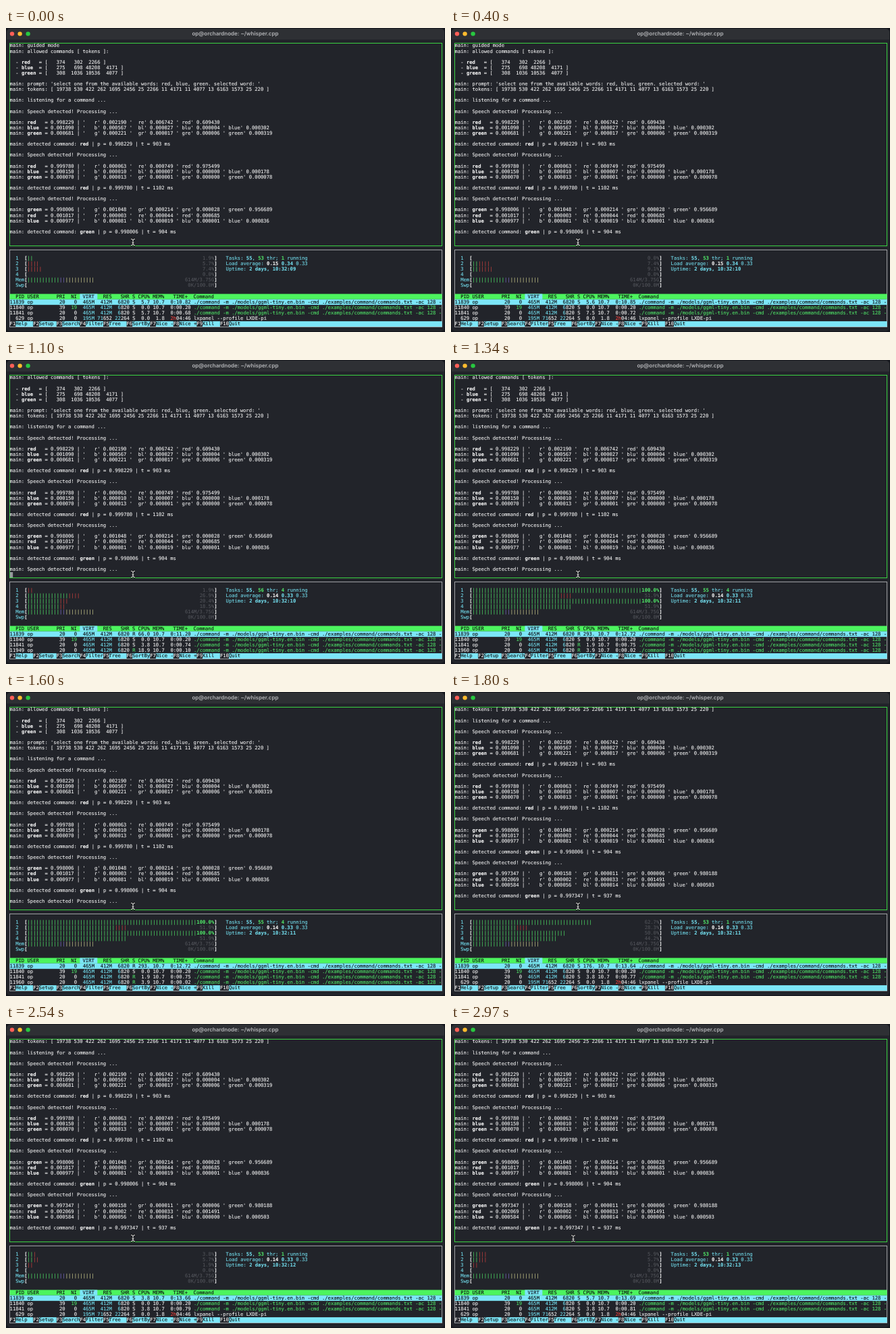
An HTML page that plays this animation: 650x450 px, repeating every 3000 ms.

```html
<!DOCTYPE html>
<html lang="en">
<head>
<meta charset="utf-8">
<title>Terminal</title>
<style>
  html, body { margin: 0; width: 100%; height: 100%; overflow: hidden; background: #14161c; }
  svg { display: block; }
  text { white-space: pre; text-rendering: geometricPrecision; }
  .mono { font: 7.182px "DejaVu Sans Mono", monospace; stroke-width: .1px; }
  .title { font: 600 8px Inter, sans-serif; }
</style>
</head>
<body>
<svg width="650" height="450" viewBox="0 0 650 450">
  <rect x="1" y="1" width="648" height="448" rx="5" fill="#22242a"/>
  <path d="M1 17V6a5 5 0 0 1 5-5H644a5 5 0 0 1 5 5V17Z" fill="#2e3034"/>
  <circle cx="9" cy="8.6" r="3.2" fill="#fe5f57"/>
  <circle cx="20.6" cy="8.6" r="3.2" fill="#febc2e"/>
  <circle cx="32.6" cy="8.6" r="3.2" fill="#28c840"/>
  <text class="title" x="339.5" y="11.4" text-anchor="middle" fill="#b4b5b8">op@orchardnode: ~/whisper.cpp</text>
  <rect x="5.5" y="22.5" width="640" height="300" fill="none" stroke="#3bd242"/>
  <rect x="5.5" y="328.5" width="640" height="114" fill="none" stroke="#9fa1a4"/>
  <g id="log" class="mono"></g>
  <g id="monitor" class="mono"></g>
  <rect id="cursor" x="5.9" y="314" width="4.3" height="8" fill="#95989c"/>
  <g id="pointer" fill="none" stroke-linecap="round">
    <path d="M-2.6-4.6Q0-4.6 0-3V3Q0 4.6-2.6 4.6M2.6-4.6Q0-4.6 0-3M2.6 4.6Q0 4.6 0 3M-1.2.9H1.2" stroke="#111" stroke-width="2.2"/>
    <path d="M-2.6-4.6Q0-4.6 0-3V3Q0 4.6-2.6 4.6M2.6-4.6Q0-4.6 0-3M2.6 4.6Q0 4.6 0 3M-1.2.9H1.2" stroke="#e8e8e8"/>
  </g>
</svg>
<script>
const LOOP = 3000;
const LEFT = 5.6, CELL = 4.324, ROW = 8.1, BASE = 6;
const LOG_TOP = 22.4, MONITOR_TOP = 328.8, COLS = 148;
const WHITE = '#f4f4f4', CYAN = '#72dcec', GREEN = '#4fe067', RED = '#c9423f',
      BLUE = '#7c6cc4', YELLOW = '#c9c98c', DIM = '#515359', BLACK = '#0c0e10',
      HEAD = '#4cf45e', SELECT = '#7ce6f8';
const $ = id => document.getElementById(id);

const put = (top, row, col, text, color = WHITE, bold = false) =>
  text.trim() ? `<text x="${LEFT + col * CELL}" y="${top + row * ROW + BASE}" fill="${color}" stroke="${color}"` +
    `${bold ? ' font-weight="700"' : ''}>${text}</text>` : '';

const fillCells = (row, col, width, color) =>
  `<rect x="${LEFT + col * CELL}" y="${MONITOR_TOP + row * ROW}" width="${width * CELL}" height="${ROW}" fill="${color}"/>`;

// Lays out [text, color, bold] runs one after another.
function runs(top, row, col, parts) {
  return parts.map(([text, color, bold]) => {
    const out = put(top, row, col, text, color, bold);
    col += text.length;
    return out;
  }).join('');
}

/* ---- command log; *word* marks bold ---- */
function score(word, p, ...values) {
  const last = values.length - 1;
  const probes = values.map((v, i) => {
    const token = i === last ? ' ' + word : word.slice(0, i + 1).padStart(4);
    return `'${token}' ${v.toFixed(6)}`;
  });
  return `main: *${word}*${' '.repeat(6 - word.length)}= ${p.toFixed(6)} | ${probes.join(' ')}`;
}

const tokens = (word, ...ids) =>
  `  - *${word}*${' '.repeat(6 - word.length)}= [ ${ids.map(n => String(n).padStart(5)).join(' ')} ]`;

const heard = (scores, word, p, ms) => [
  'main: Speech detected! Processing ...', '', ...scores, '',
  `main: detected command: *${word}* | p = ${p} | t = ${ms} ms`, ''
];

const lines = [
  'main: guided mode',
  'main: allowed commands [ tokens ]:', '',
  tokens('red', 374, 302, 2266),
  tokens('blue', 275, 698, 48208, 4171),
  tokens('green', 308, 1036, 10536, 4077), '',
  "main: prompt: 'select one from the available words: red, blue, green. selected word: '",
  'main: tokens: [ 19738 530 422 262 1695 2456 25 2266 11 4171 11 4077 13 6163 1573 25 220 ]', '',
  'main: listening for a command ...', '',
  ...heard([
    score('red', 0.998229, 0.002190, 0.006742, 0.609430),
    score('blue', 0.001090, 0.000567, 0.000027, 0.000004, 0.000302),
    score('green', 0.000681, 0.000221, 0.000017, 0.000006, 0.000319)
  ], 'red', '0.998229', 903),
  ...heard([
    score('red', 0.999780, 0.000063, 0.000749, 0.975499),
    score('blue', 0.000150, 0.000010, 0.000007, 0.000000, 0.000178),
    score('green', 0.000070, 0.000013, 0.000001, 0.000000, 0.000078)
  ], 'red', '0.999780', 1102),
  ...heard([
    score('green', 0.998006, 0.001048, 0.000214, 0.000028, 0.956689),
    score('red', 0.001017, 0.000003, 0.000044, 0.000685),
    score('blue', 0.000977, 0.000081, 0.000019, 0.000001, 0.000836)
  ], 'green', '0.998006', 904),
  ...heard([
    score('green', 0.997347, 0.000158, 0.000011, 0.000006, 0.980188),
    score('red', 0.002069, 0.000002, 0.000033, 0.001491),
    score('blue', 0.000584, 0.000056, 0.000014, 0.000000, 0.000503)
  ], 'green', '0.997347', 937)
];

const drawLog = scroll => lines.slice(scroll, scroll + 36).map((line, row) =>
  runs(LOG_TOP, row, 0, line.split('*').map((part, i) => [part, WHITE, i % 2 === 1]))).join('');

/* ---- process monitor ---- */
const COMMAND = './command -m ./models/ggml-tiny.en.bin -cmd ./examples/command/commands.txt -ac 128 -';
const PANEL = 'panel';

// cpus: [percent, green bars, red bars]; main, worker and extra: [state, cpu, time]
const samples = [
  { clock: '09', threads: 53, running: 1, load: ['0.15', '0.34'],
    cpus: [['1.9', 2, 0], ['5.7', 0, 4], ['7.4', 0, 5], ['0.0', 0, 0]],
    main: ['S', '5.7', '0:10.82'], worker: ['S', '5.7', '0:00.68'], extra: PANEL },
  { clock: '10', threads: 53, running: 1, load: ['0.15', '0.34'],
    cpus: [['0.0', 0, 0], ['7.4', 2, 4], ['9.1', 2, 5], ['0.0', 0, 0]],
    main: ['S', '5.6', '0:10.85'], worker: ['S', '7.5', '0:00.72'], extra: PANEL },
  { clock: '10', threads: 56, running: 4, load: ['0.14', '0.33'],
    cpus: [['1.9', 0, 2], ['26.9', 14, 4], ['20.4', 11, 3], ['18.5', 11, 2]],
    main: ['R', '66.0', '0:11.20'], worker: ['S', '3.8', '0:00.74'], extra: ['R', '18.9', '0:00.10'], pid: '11949' },
  { clock: '11', threads: 55, running: 4, load: ['0.14', '0.33'],
    cpus: [['100.0', 58, 0], ['51.9', 30, 4], ['100.0', 58, 0], ['51.9', 34, 0]],
    main: ['R', '293.', '0:12.72'], worker: ['R', '1.9', '0:00.75'], extra: ['R', '3.9', '0:00.02'], pid: '11960' },
  { clock: '11', threads: 53, running: 1, load: ['0.14', '0.33'],
    cpus: [['62.7', 41, 0], ['28.3', 15, 4], ['50.0', 32, 0], ['44.2', 29, 0]],
    main: ['S', '176.', '0:13.64'], worker: ['S', '3.8', '0:00.77'], extra: PANEL },
  { clock: '12', threads: 53, running: 1, load: ['0.14', '0.33'],
    cpus: [['3.8', 2, 1], ['5.7', 2, 2], ['1.9', 0, 2], ['0.0', 0, 0]],
    main: ['S', '3.8', '0:13.66'], worker: ['S', '3.8', '0:00.79'], extra: PANEL },
  { clock: '13', threads: 53, running: 1, load: ['0.14', '0.33'],
    cpus: [['5.9', 2, 3], ['5.7', 2, 3], ['1.9', 0, 2], ['0.0', 0, 0]],
    main: ['S', '5.7', '0:13.69'], worker: ['S', '3.8', '0:00.81'], extra: PANEL }
];

const screen = (row, col, ...parts) => runs(MONITOR_TOP, row, col, parts);

function meter(row, label, bars, value) {
  const full = value === '100.0%';
  return screen(row, 2, [label.padEnd(3), CYAN], ['[', WHITE, true],
      ...bars.map(([n, color]) => ['|'.repeat(n), color])) +
    screen(row, 70 - value.length, [value, full ? GREEN : DIM, full], [']', WHITE, true]);
}

// Thousands and megabytes are tinted, the rest stays white.
function size(row, col, text) {
  const [, big, rest] = /^(\d+M|\d+(?=\d{3}$))(.*)$/.exec(text);
  return screen(row, col + 5 - text.length, [big, CYAN], [rest, WHITE]);
}

function process(row, pid, [state, cpu, time], { pri = '20', ni = '0', sizes = ['465M', '412M', '6820'],
    mem = '10.7', command = COMMAND, color = GREEN, selected = false } = {}) {
  const ink = normal => selected ? BLACK : normal;
  const hours = /^\d+h/.exec(time)?.[0] ?? '';
  return (selected ? fillCells(row, 0, COLS, SELECT) : '') +
    screen(row, 0, [pid.padStart(5) + ' op'.padEnd(11) + pri.padStart(3), ink(WHITE)],
      [ni.padStart(4), ink(ni === '19' ? GREEN : WHITE)]) +
    sizes.map((s, i) => selected
      ? screen(row, 24 + i * 6, [s.padStart(5), BLACK])
      : size(row, 24 + i * 6, s)).join('') +
    screen(row, 42, [state, ink(state === 'R' ? GREEN : WHITE)],
      [cpu.padStart(5) + mem.padStart(5) + '  ', ink(WHITE)],
      [hours, '#f0403c'], [time.slice(hours.length) + ' ', ink(WHITE)],
      [command, ink(color)]);
}

function footer() {
  const labels = ['Help', 'Setup', 'Search', 'Filter', 'Tree', 'SortBy', 'Nice -', 'Nice +', 'Kill', 'Quit'];
  return labels.map((label, i) => {
    const key = `F${i + 1}`, col = i * 8, start = col + key.length;
    return fillCells(13, start, i === 9 ? COLS - start : 6, SELECT) +
      screen(13, col, [key, WHITE], [label, BLACK]);
  }).join('');
}

function drawMonitor(s) {
  const extra = s.extra === PANEL
    ? process(12, '629', ['S', '0.0', '2h04:46'], { sizes: ['195M', '71652', '22264'], mem: '1.8',
        command: 'lxpanel --profile LXDE-pi', color: WHITE })
    : process(12, s.pid, s.extra);
  return s.cpus.map(([pct, user, kernel], i) =>
      meter(i + 1, String(i + 1), [[user, GREEN], [kernel, RED]], pct + '%')).join('') +
    meter(5, 'Mem', [[11, GREEN], [2, BLUE], [10, YELLOW]], '614M/3.75G') +
    meter(6, 'Swp', [], '0K/100.0M') +
    screen(1, 74, ['Tasks: ', CYAN], ['55', CYAN, true], [', ', CYAN], [String(s.threads), GREEN, true],
      [' thr; ', CYAN], [String(s.running), GREEN, true], [' running', CYAN]) +
    screen(2, 74, ['Load average: ', CYAN], [s.load[0] + ' ', WHITE, true],
      [s.load[1] + ' ', CYAN, true], ['0.33', CYAN]) +
    screen(3, 74, ['Uptime: ', CYAN], [`2 days, 10:32:${s.clock}`, CYAN, true]) +
    fillCells(8, 0, COLS, HEAD) + fillCells(8, 24, 6, SELECT) +
    screen(8, 0, ['  PID USER      PRI  NI  VIRT   RES   SHR S CPU% MEM%   TIME+  Command', BLACK]) +
    process(9, '11839', s.main, { selected: true }) +
    process(10, '11840', ['S', '0.0', '0:00.20'], { pri: '39', ni: '19' }) +
    process(11, '11841', s.worker) + extra + footer();
}

/* ---- timeline ---- */
const SPEECH = 680, RESULT = 1650, REFRESH = 527, FIRST_REFRESH = 210;
const shown = {};

function update(id, key, draw) {
  if (shown[id] === key) return;
  shown[id] = key;
  $(id).innerHTML = draw();
}

function render(t) {
  const scroll = t < SPEECH ? 0 : t < RESULT ? 1 : 8;
  const sample = Math.max(0, Math.floor((t - FIRST_REFRESH) / REFRESH) + 1);
  update('log', scroll, () => drawLog(scroll));
  update('monitor', sample, () => drawMonitor(samples[sample]));
  $('cursor').setAttribute('visibility', t >= SPEECH && t < 1220 ? 'visible' : 'hidden');
  const k = Math.min(1, Math.max(0, (t - 2640) / 300));
  const ease = k * k * (3 - 2 * k);
  $('pointer').setAttribute('transform', `translate(${188 - 7 * ease} ${317 + 0.5 * ease})`);
}

function tick() {
  render(performance.now() % LOOP);
  requestAnimationFrame(tick);
}
tick();
</script>
</body>
</html>
```
